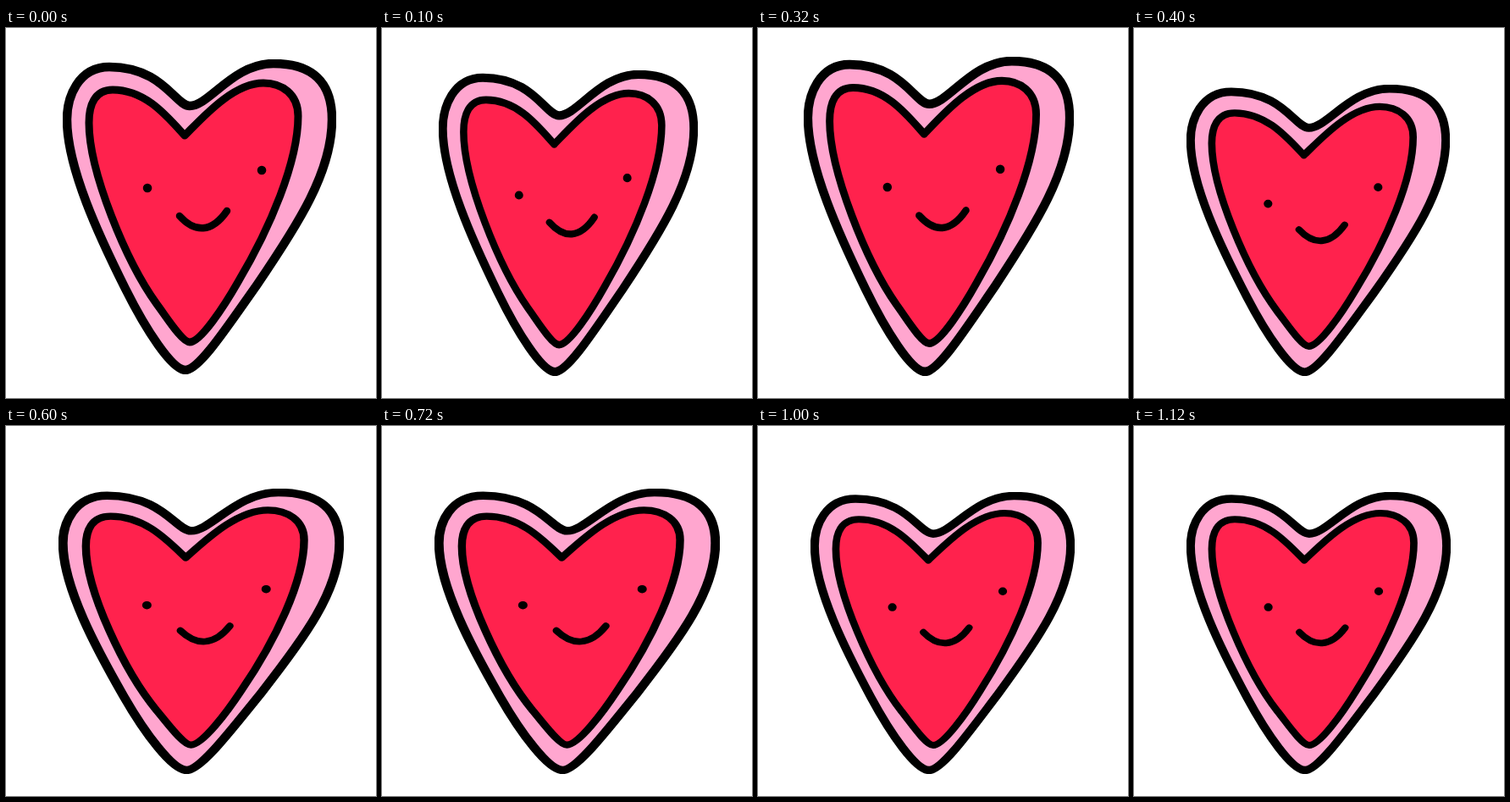
These frames come from a looping animation (437 by 437 pixels, 1200 ms). An HTML page:

```html
<!DOCTYPE html>
<html>
<head>
<meta charset="utf-8">
<title>Wobbling heart</title>
<style>
  html, body { margin: 0; height: 100%; overflow: hidden; background: #fff; }
  svg { display: block; }
  path { fill: none; stroke: #000; stroke-linecap: round; stroke-linejoin: round; }
  .outer { fill: #ffa6cf; stroke-width: 10.5; }
  .inner { fill: #ff224d; stroke-width: 9; }
  .smile { stroke-width: 8.5; }
  .eyes { stroke-width: 10.5; }
</style>
</head>
<body>
<svg width="437" height="437">
  <clipPath id="frame"><rect x="67" y="37" width="323" height="372"/></clipPath>
  <g id="heart" clip-path="url(#frame)">
    <path class="outer" d="M217 92C200 92 185 46 122 46C85 46 72 82 72 108
      C72 165 110 246 141 308C165 356 196 404 212 404C228 404 262 352 296 304
      C345 232 385 170 385 108C385 64 362 42 316 42C268 42 240 92 217 92Z"/>
    <path class="inner" d="M211 127C190 104 165 73 126 73C104 73 98 92 98 112
      C98 170 142 276 178 326C190 342 208 371 217 371C230 371 258 328 274 300
      C312 236 345 158 345 104C345 78 326 65 304 65C268 65 232 106 211 127Z"/>
    <path class="smile" d="M205 222C223 242 243 242 261 216"/>
    <path class="eyes" d="M167 189h.1M302 168h.1"/>
  </g>
</svg>
<script>
const heart = document.getElementById('heart');
const LOOP = 1200, STEP = 200;

// The box the heart is squeezed into: left, right, top and, if not 411, bottom
const poses = [
  [67, 390, 37, 409], [67, 373, 50], [54, 373, 34], [62, 373, 67],
  [62, 399, 74], [62, 364, 63], [62, 374, 78]
];

function draw(now) {
  const time = now % LOOP;
  // The first step is split into two half-length poses.
  const index = time < STEP / 2 ? 0 : 1 + Math.floor(time / STEP);
  const [left, right, top, bottom = 411] = poses[index];
  const scaleX = (right - left) / 323, scaleY = (bottom - top) / 372;
  heart.setAttribute('transform',
    `translate(${left} ${top}) scale(${scaleX} ${scaleY}) translate(-67 -37)`);
}

function tick() {
  draw(performance.now());
  requestAnimationFrame(tick);
}
tick();
</script>
</body>
</html>
```
